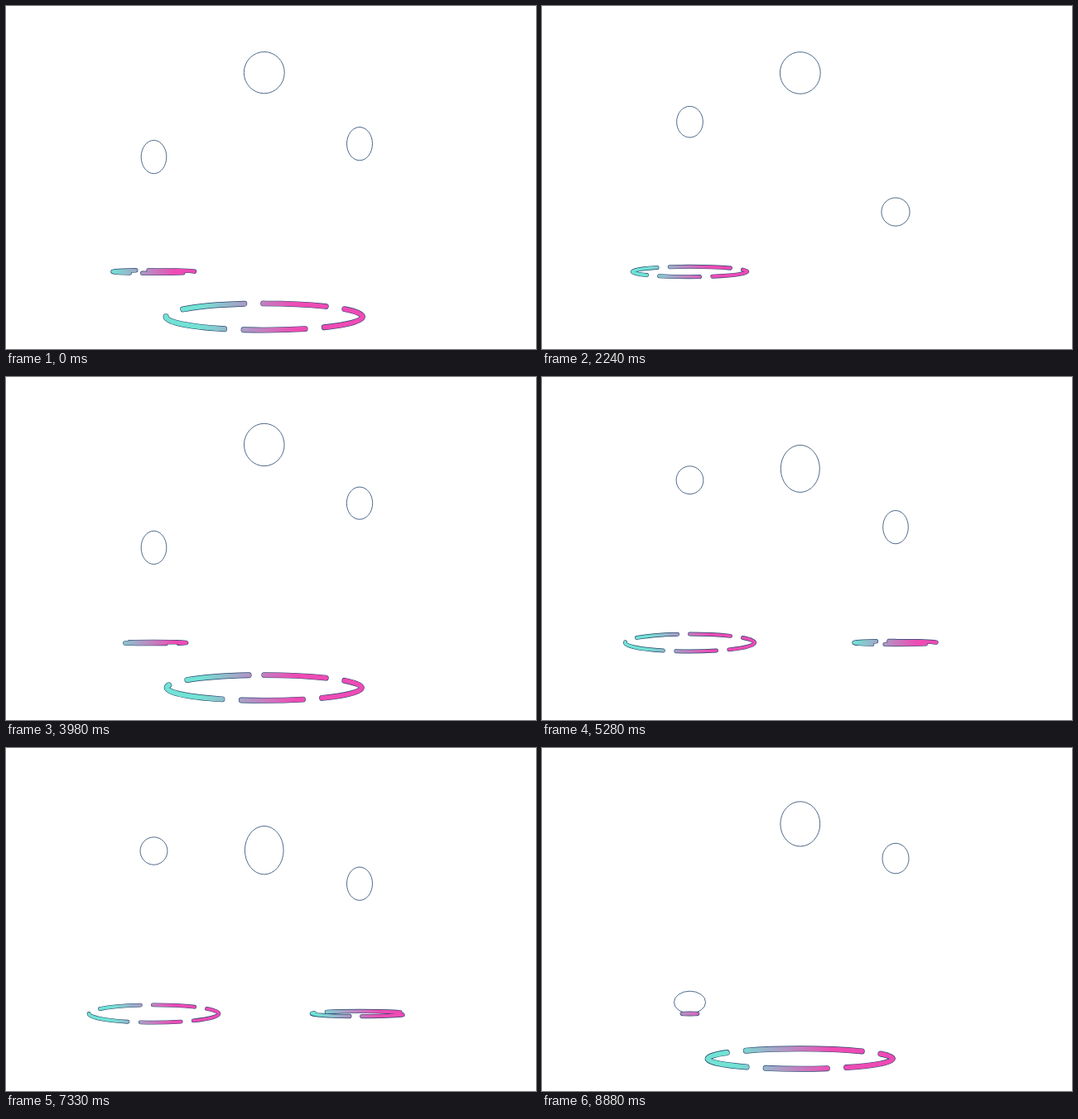
An HTML page with a canvas for the animation above (8960 ms loop, 640 by 415 pixels).

```html
<!DOCTYPE html>
<html lang="en">
<head>
<meta charset="utf-8">
<title>Bouncing balls</title>
<style>
  html, body { margin: 0; width: 100%; height: 100%; overflow: hidden; background: #fff; }
  canvas { display: block; width: 640px; height: 415px; }
</style>
</head>
<body>
<canvas id="stage" width="640" height="415"></canvas>
<script>
const ctx = document.getElementById('stage').getContext('2d');
const LOOP = 8960;
const NAVY = '#24466e';

// pacing of the loop: time in ms, picture count, bounce phase (even: apex, odd: floor)
const KEYS = [
  [0, 0, -0.765], [990, 11, 1.092], [2240, 25, 3.438], [3980, 46, 7.17],
  [5280, 61, 9.763], [7330, 85, 13.825], [8880, 103, 17.02], [LOOP, 104, 17.2]
];

const SMALL = { top: 141.5, floor: 321.5, size: 33.8, power: 4, reach: 78.5, depth: 10.7, line: 5.5 };
const BIG = { top: 105.5, floor: 376, size: 50, power: 2.5, reach: 119.2, depth: 16.4, line: 7.8 };
const BALLS = [
  { ...SMALL, x: 178.5, shift: 0 },
  { ...SMALL, x: 427, shift: 1.475 },
  { ...BIG, x: 311.8, shift: 0.675 }
];

// bounce phase at a time; the picture holds between counts
function phaseAt(time) {
  const i = KEYS.findIndex(k => k[0] > time);
  const [t0, n0, p0] = KEYS[i - 1], [t1, n1, p1] = KEYS[i];
  const count = n1 - n0;
  const held = Math.floor((time - t0) / (t1 - t0) * count + 1e-4) / count;
  return p0 + (p1 - p0) * held;
}

function drawBall(b, drop) {
  // short contact with the floor near the end of the fall
  const d = Math.min(1, drop + Math.max(0, drop - 0.7) * 0.35);
  const speed = Math.sqrt(d);
  // stretch with speed, then squash at the floor
  const h = b.size * (1 + Math.min(0.44 * speed, 0.215, 1.11 - 1.29 * speed));
  const w = b.size * (1 + Math.max(-0.12 * speed, 0.7 * speed - 0.55));
  const bottom = b.top + (b.floor - b.top) * d;
  ctx.beginPath();
  ctx.ellipse(b.x, bottom - h / 2, w / 2 - 0.4, h / 2 - 0.4, 0, 0, Math.PI * 2);
  ctx.fillStyle = '#fff';
  ctx.fill();
  ctx.lineWidth = 0.8;
  ctx.strokeStyle = NAVY;
  ctx.stroke();
}

function drawRipple(b, drop) {
  const rest = Math.pow(drop, 0.93);
  const rx = b.reach * Math.max(0.115, 1 - rest);
  const ry = b.depth * Math.exp(-4.7 * rest);
  const line = b.line * (0.88 + 0.3 * Math.min(rest, 0.4));
  const paint = ctx.createLinearGradient(b.x - 0.65 * b.reach, 0, b.x + 0.32 * b.reach, 0);
  paint.addColorStop(0, '#72e2d4');
  paint.addColorStop(1, '#ee4bb4');
  ctx.save();
  ctx.lineCap = 'round';
  ctx.setLineDash([0.623 * b.reach, 0.193 * b.reach]);
  ctx.beginPath();
  ctx.ellipse(b.x, b.floor, rx, ry, 0, -Math.PI / 2, Math.PI * 1.5);
  ctx.lineWidth = line;
  ctx.strokeStyle = NAVY;
  ctx.stroke();
  ctx.lineWidth = line - 1.2;
  ctx.strokeStyle = paint;
  ctx.stroke();
  ctx.restore();
}

function draw(time) {
  const phase = phaseAt(time % LOOP);
  ctx.fillStyle = '#fff';
  ctx.fillRect(0, 0, 640, 415);
  for (const b of BALLS) {
    const p = phase + b.shift + 1;
    const u = p - 2 * Math.floor(p / 2) - 1;   // -1 floor, 0 apex, 1 floor
    const drop = Math.pow(Math.abs(u), b.power);
    drawBall(b, drop);
    if (u < 0) drawRipple(b, drop);
  }
}

const start = performance.now();
function tick() {
  draw(performance.now() - start);
  requestAnimationFrame(tick);
}
tick();
</script>
</body>
</html>
```
